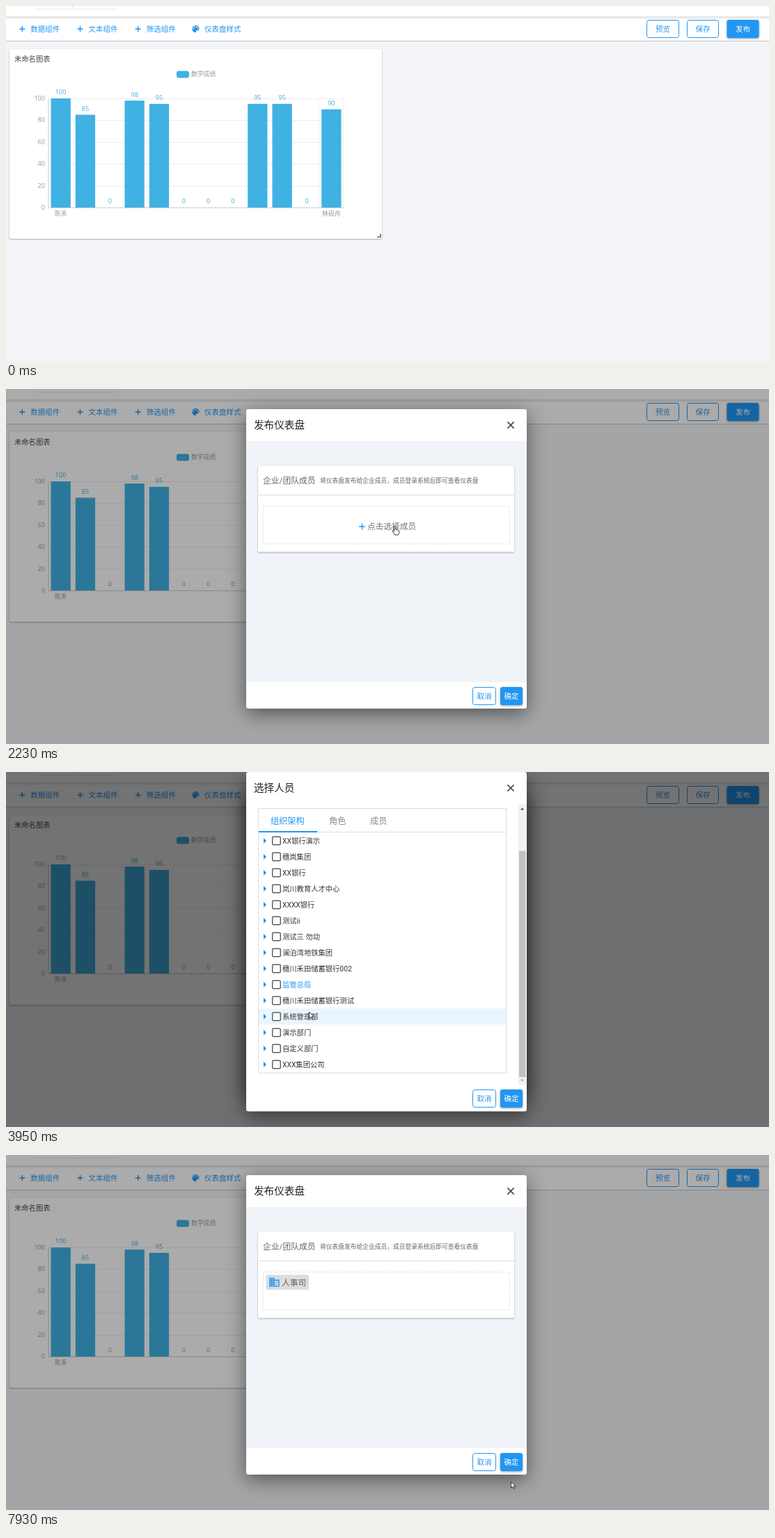
Write an HTML page that moves like this. It is 1096x511 px and loops after 7.99 s.

```html
<!DOCTYPE html>
<html lang="zh-CN">
<head>
<meta charset="utf-8">
<title>发布仪表盘</title>
<style>
  html, body { margin: 0; width: 100%; height: 100%; overflow: hidden; background: #f4f5f9; }
  svg { display: block; width: 1096px; height: 511px; }
  text { font-family: Roboto, "Noto Sans CJK SC", "Noto Sans CJK", sans-serif; white-space: pre; }
  .num { font-family: "Open Sans", "Noto Sans", sans-serif; }
  .card { filter: drop-shadow(0 1px 1px rgba(0, 0, 0, .3)); }
  .raised { filter: drop-shadow(0 1px 1.5px rgba(0, 0, 0, .4)); }
  .lifted { filter: drop-shadow(0 3px 4px rgba(0, 0, 0, .5)); }
  .modal { filter: drop-shadow(0 7px 14px rgba(0, 0, 0, .5)); }
</style>
</head>
<body>
<svg viewBox="0 0 1096 511" xmlns="http://www.w3.org/2000/svg">
  <defs>
    <linearGradient id="shade" x2="0" y2="1">
      <stop offset="0" stop-color="#000" stop-opacity=".13"/>
      <stop offset="1" stop-color="#000" stop-opacity="0"/>
    </linearGradient>
    <clipPath id="view"><rect x="345" y="46" width="403" height="404.5"/></clipPath>
  </defs>
  <g id="page"></g>
  <g id="publish"></g>
  <g id="picker"></g>
  <g id="cursor"></g>
</svg>
<script>
const LOOP = 7990;
const BLUE = '#2196f3', BAR = '#40b1e3';
const $ = id => document.getElementById(id);
const clamp = v => Math.max(0, Math.min(1, v));
const smooth = v => v * v * (3 - 2 * v);
const ramp = (t, a, b) => smooth(clamp((t - a) / (b - a)));

// --- drawing helpers ---
const rect = (x, y, w, h, fill, more = '') =>
  `<rect x="${x}" y="${y}" width="${w}" height="${h}" fill="${fill}" ${more}/>`;
const path = (d, stroke, width = 1, more = '') =>
  `<path d="${d}" fill="none" stroke="${stroke}" stroke-width="${width}" ${more}/>`;
const shape = (d, fill, more = '') => `<path d="${d}" fill="${fill}" ${more}/>`;
// y is the middle of the line of text
const text = (x, y, s, size, fill, anchor = 'start', cls = '') =>
  `<text x="${x}" y="${(y + size * 0.37).toFixed(2)}" font-size="${size}" fill="${fill}" text-anchor="${anchor}" class="${cls}">${s}</text>`;
const plus = (x, y, r) => path(`M${x - r} ${y}h${2 * r}M${x} ${y - r}v${2 * r}`, BLUE, 1.4);
const cross = (x, y) => path(`M${x - 4.6} ${y - 4.6}l9.2 9.2m0 -9.2l-9.2 9.2`, '#444', 1.5);
const dashed = (x, y, w, h) =>
  rect(x + .5, y + .5, w - 1, h - 1, 'none', 'stroke="#e0e0e0" stroke-dasharray="2 1.5"');

function button(x, y, w, label, solid, cls = 'raised') {
  const box = solid
    ? rect(x, y, w, 26, BLUE, `rx="3" class="${cls}"`)
    : rect(x + .5, y + .5, w - 1, 25, '#fff', `rx="3" stroke="${BLUE}"`);
  return box + text(x + w / 2, y + 13, label, 10.6, solid ? '#fff' : BLUE, 'middle');
}

const footer = (y, cls) => button(670, y, 34, '取消') + button(710, y, 32, '确定', true, cls);

// --- dashboard page ---
function palette(x, y) {
  const holes = [[6.5, 10.5], [9.5, 6.5], [14.5, 6.5], [17.5, 10.5]]
    .map(([cx, cy]) => `<circle cx="${cx}" cy="${cy}" r="1.5" fill="#fff"/>`).join('');
  return `<g transform="translate(${x} ${y}) scale(.56) translate(-12 -12)">` +
    shape('M12 3c-4.97 0-9 4.03-9 9s4.03 9 9 9c.83 0 1.5-.67 1.5-1.5 0-.4-.15-.74-.39-1-1-1.2-.2-2.5 1.12-2.5H16c2.76 0 5-2.24 5-5 0-4.42-4.03-8-9-8z', BLUE) +
    holes + '</g>';
}

function chart() {
  const values = [100, 85, 0, 98, 95, 0, 0, 0, 95, 95, 0, 90];
  const left = 61, base = 290, step = 424 / 12, unit = 1.57;
  let s = rect(5, 62, 535, 273, '#fff', 'rx="2" class="card"') +
    text(12, 76.5, '未命名图表', 10.3, '#454545') +
    rect(245, 93.5, 18, 10, BAR, 'rx="3"') +
    text(266, 98, '数学成绩', 8.8, '#999');
  for (let v = 0; v <= 100; v += 20) {
    const y = Math.round(base - v * unit) + .5;
    if (v) s += path(`M61 ${y}H485`, '#ececec');
    s += text(56, y - 1, v, 9.1, '#999', 'end', 'num');
  }
  s += path('M449.5 133V290M484.5 133V290', '#f2f2f2') + path('M61 133V290.5H485', '#ccc');
  values.forEach((v, i) => {
    const x = left + i * step, h = v * unit;
    s += rect((x + 3.5).toFixed(1), base - h, 28.3, h, BAR) +
      text(x + step / 2, base - h - 9, v, 9.1, BAR, 'middle', 'num');
  });
  return s + text(78.7, 299, '陈禾', 8.8, '#999', 'middle') +
    text(467.3, 299, '林砚舟', 8.8, '#999', 'middle') +
    path('M538 328v4.5h-5', '#666', 1.6);
}

function page() {
  let s = rect(0, 0, 1096, 511, '#f4f5f9') +
    rect(0, 0, 1096, 50, '#fff') + rect(0, 15, 1096, 5, 'url(#shade)') +
    path('M0 50.5H1096', '#c4c4c4') +
    path('M42 4.5H158', '#ddd', 1, 'stroke-dasharray="2 1"') + path('M51 0l2 -1M95 0v1', '#777');
  ['数据组件', '文本组件', '筛选组件'].forEach((label, i) => {
    const x = 23.3 + i * 83.2;
    s += plus(x, 33, 4) + text(x + 12, 33, label, 10.5, BLUE);
  });
  return s + palette(272.5, 33) + text(285, 33, '仪表盘样式', 10.5, BLUE) +
    button(920, 20, 47, '预览') + button(978, 20, 46, '保存') +
    `<g id="go">${button(1035.5, 20, 46, '发布', true)}</g>` + chart();
}

// --- publish dialog ---
function building(x, y) {
  let s = shape('M12 7V3H2v18h20V7z', BLUE);
  for (let i = 0; i < 4; i++) {
    s += rect(4, 5 + 4 * i, 2, 2, '#dcdcdc') + rect(8, 5 + 4 * i, 2, 2, '#dcdcdc');
  }
  s += shape('M12 9h8v10h-8v-2h2v-2h-2v-2h2v-2h-2z', '#dcdcdc') +
    rect(16, 11, 2, 2, BLUE) + rect(16, 15, 2, 2, BLUE);
  return `<g transform="translate(${x} ${y}) scale(.72)">${s}</g>`;
}

const scrim = rect(0, 0, 1096, 511, '#000', 'opacity=".33"');

function publishDialog() {
  return scrim + rect(345, 29, 403, 431, '#fff', 'rx="3" class="modal"') +
    rect(345, 75, 403, 347, '#f0f4f8') +
    text(356, 52, '发布仪表盘', 14.6, '#222') + cross(725, 52) +
    rect(362, 110.5, 368, 124, '#fff', 'rx="1" class="card"') +
    path('M362 152.5H730', '#ddd') +
    text(369, 132, '企业/团队成员', 11.8, '#666') +
    text(451, 132, '将仪表盘发布给企业成员，成员登录系统后即可查看仪表盘', 8.75, '#666') +
    dashed(369, 168, 355, 55.5) +
    `<g id="prompt">${plus(511.5, 198, 4.5)}${text(519, 198, '点击选择成员', 11.7, '#777')}</g>` +
    `<g id="chip">${rect(373.5, 172.5, 61.5, 21.5, '#dcdcdc', 'rx="2"')}${building(376.8, 174.5)}${text(396, 183.5, '人事司', 11.8, '#666')}</g>` +
    footer(429);
}

// --- member picker dialog ---
const units = ['XX银行演示', '穗岚集团', 'XX银行', '岚川教育人才中心', 'XXXX银行', '测试ii', '测试三 勿动',
  '澜泊湾地铁集团', '穗川禾田储蓄银行002', '监管总局', '穗川禾田储蓄银行测试', '系统管理部', '演示部门',
  '自定义部门', 'XXX集团公司'];
const children = ['金融保险部', '办公厅', '人事司'];
const OPEN = 12;
const GROW = 2780, EXPAND = 4960, CHECK = 6300;
const scrollAt = t => 69 * ramp(t, 3390, 3600);

function treeRows(open) {
  const list = units.map((label, i) => ({ label, open: open && i === OPEN, indent: 0 }));
  if (open) list.splice(OPEN + 1, 0, ...children.map(label => ({ label, indent: 12 })));
  return list;
}

function treeRow(row, y, hot, lit, checked) {
  const x = 362 + row.indent;
  const arrow = row.open ? 'M368.5 377.5h5v-5z' : `M${x + 8} ${y - 4}l4 4l-4 4z`;
  return (hot ? rect(363, y - 11.5, 355, 23, '#ebf5fd') : '') +
    (row.open ? `<g transform="translate(0 ${y - 375})">${shape(arrow, BLUE)}</g>` : shape(arrow, BLUE)) +
    rect(x + 20.7, y - 5.8, 11.6, 11.6, checked ? BLUE : '#fff',
      `rx="1.5" stroke="${checked ? BLUE : '#5f5f5f'}" stroke-width="1.5"`) +
    (checked ? path(`M${x + 23} ${y}l2.5 2.7l5 -5.4`, '#fff', 1.6) : '') +
    text(x + 35, y, row.label, 10.3, lit ? BLUE : '#333');
}

function scrollbar(offset, total) {
  const thumb = 381 * 404 / total, y = 58 + 381 * offset / total;
  const atEnd = offset >= total - 404.5;
  return rect(736, 46, 11.5, 404.5, '#f1f1f1') +
    rect(737, y.toFixed(1), 9.5, thumb.toFixed(1), '#c1c1c1') +
    shape('M739 54.5h5l-2.5 -3z', offset > 0 ? '#444' : '#aaa') +
    shape('M739 442.5h5l-2.5 3z', atEnd ? '#aaa' : '#444');
}

function pickerDialog(t) {
  const large = t >= GROW, open = t >= EXPAND;
  const top = large ? 0 : 66, bottom = large ? 488.5 : 422;
  const right = large ? 718 : 730;
  const offset = large ? scrollAt(t) : 0;
  const y0 = top + 121 - offset;
  const rows = large ? treeRows(open) : [];
  const height = large ? 35 + rows.length * 23 + .5 : 180.5;
  const hot = hoverRow(t), lit = hoverRow(t - 100);

  let body = dashed(362, top + 51 - offset, right - 362, 55) +
    text((362 + right) / 2, top + 80 - offset, '暂无选中项', 11.8, '#777', 'middle') +
    rect(362.5, y0 + .5, right - 362, height, '#fff', 'stroke="#ddd"') +
    path(`M363 ${y0 + 34.5}H${right}`, '#ddd') +
    rect(363, y0 + 33, 84, 2, BLUE) +
    text(380, y0 + 18, '组织架构', 12.2, BLUE) +
    text(464, y0 + 18, '角色', 12.2, '#888') +
    text(523, y0 + 18, '成员', 12.2, large ? '#888' : '#333');
  rows.forEach((row, i) => {
    const y = y0 + 47 + 23 * i;
    if (y < 470) body += treeRow(row, y, i === hot, i === lit, t >= CHECK && row.label === '人事司');
  });
  if (large) body = `<g clip-path="url(#view)">${body}</g>` + scrollbar(offset, open ? 542 : 473);

  return scrim + rect(345, top, 403, bottom - top, '#fff', 'rx="3" class="modal"') +
    text(356, top + 23, '选择人员', 14.6, '#222') + cross(725, top + 23) + body +
    footer(large ? 457 : 391, t > 7050 ? 'lifted' : 'raised');
}

// --- pointer ---
const moves = [
  [150, 1094, 511], [910, 1059, 39], [1400, 1059, 39], [2150, 558.5, 197],
  [3250, 558.5, 197], [3870, 452, 306], [3950, 435, 345], [4060, 435, 345],
  [4680, 371, 373], [5000, 371, 373], [5640, 404, 398], [5740, 406, 412],
  [5820, 406, 412], [6120, 400, 442], [6600, 400, 442], [7100, 725, 470], [LOOP, 725, 470]
];

function pointer(t) {
  const i = moves.findIndex(m => m[0] > t);
  if (i < 1) return moves[i < 0 ? moves.length - 1 : 0].slice(1);
  const [ta, xa, ya] = moves[i - 1], [tb, xb, yb] = moves[i];
  const k = ramp(t, ta, tb);
  return [xa + (xb - xa) * k, ya + (yb - ya) * k];
}

function hoverRow(t) {
  if (t < GROW) return -1;
  const [x, y] = pointer(t);
  if (x < 363 || x > 718 || y > 450) return -1;
  return Math.floor((y - 156 + scrollAt(t)) / 23);
}

const arrowShape = shape('M.5 .5v9l2.2 -2l1.5 3.2l1.5 -.7l-1.5 -3.1h2.9z', '#fff', 'stroke="#222" stroke-width=".9"');
const handShape = shape('M-1 1.2q0 -1.2 1 -1.2t1 1.2v4l4 .9q1.4 .4 1.3 1.9q-.2 3 -1.3 5h-5q-1.5 -2.8 -3.3 -4.7q-.6 -1.4 .8 -1.3l1.5 1z',
  '#fff', 'stroke="#222" stroke-width=".9" stroke-linejoin="round"');
const within = (t, a, b) => t >= a && t < b;
const isHand = t => within(t, 1900, GROW) || within(t, 4600, 5000) || within(t, 5600, 6750) || within(t, 7000, 7900);

// --- one function sets the picture for a time ---
function fade(g, alpha) {
  g.setAttribute('opacity', alpha.toFixed(3));
  g.style.display = alpha > 0 ? '' : 'none';
}

$('page').innerHTML = page();
$('publish').innerHTML = publishDialog();
let lastPicker = '';

function draw(t) {
  const picked = t >= 7310;
  $('go').firstChild.setAttribute('class', within(t, 800, 1500) ? 'lifted' : 'raised');
  fade($('publish'), ramp(t, 1310, 1560));
  $('prompt').style.display = picked ? 'none' : '';
  $('chip').style.display = picked ? '' : 'none';

  const alpha = ramp(t, 2330, 2391) * (1 - ramp(t, 7310, 7540));
  fade($('picker'), alpha);
  if (alpha > 0) {
    const markup = pickerDialog(t);
    if (markup !== lastPicker) $('picker').innerHTML = lastPicker = markup;
  }

  const [x, y] = pointer(t);
  $('cursor').style.display = t < 150 || within(t, 7600, 7930) ? 'none' : '';
  $('cursor').setAttribute('transform', `translate(${x.toFixed(1)} ${y.toFixed(1)})`);
  $('cursor').innerHTML = isHand(t) ? handShape : arrowShape;
}

const start = performance.now();
function tick() {
  draw((performance.now() - start) % LOOP);
  requestAnimationFrame(tick);
}
tick();
</script>
</body>
</html>
```
